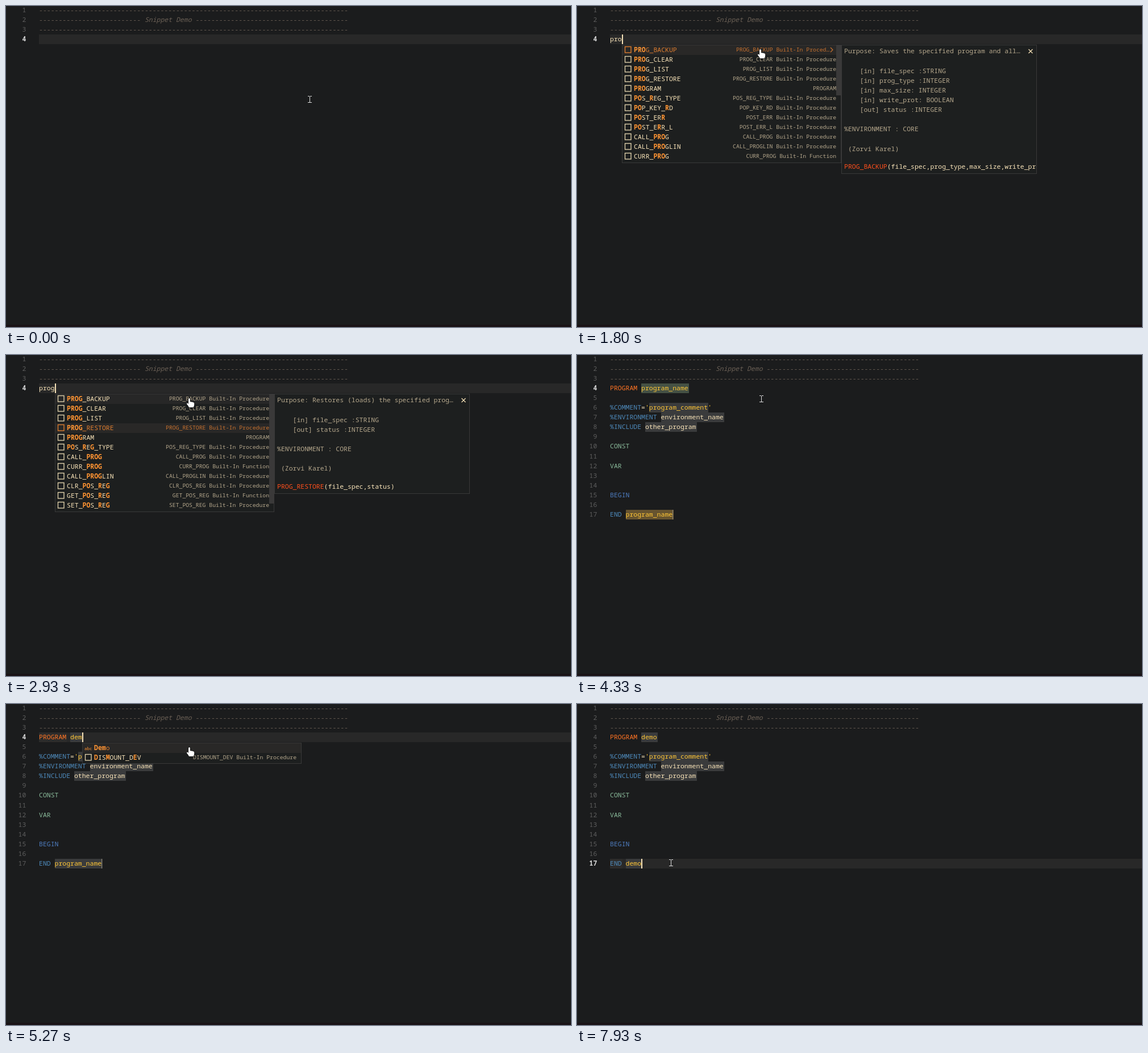
Write an HTML page with a canvas that moves like this. It is 994 by 564 pixels and loops after 8 s.

```html
<!DOCTYPE html>
<html lang="en">
<head>
<meta charset="utf-8">
<title>Snippet Demo</title>
<style>
html, body { margin: 0; width: 100%; height: 100%; overflow: hidden; background: #1b1c1d; }
canvas { display: block; }
</style>
</head>
<body>
<canvas id="stage" width="994" height="564"></canvas>
<script>
const ctx = document.getElementById('stage').getContext('2d');
const LOOP = 8000, TICK = 1000 / 15;
const LEFT = 58, CHAR = 6.885, ROW = 17.08, SMALL = 5.87;
const POP_TOP = 68, POP_W = 386, DOC_W = 344;

const C = {
  bg: '#1b1c1d', line: '#282828', fg: '#f8e3b8', dim: '#b5a78c', comment: '#6b6056',
  number: '#5e5e5e', activeNumber: '#d8d8d8', orange: '#ff7424', match: '#ff9433',
  picked: '#dc7c2f', yellow: '#ffc636', blue: '#4e8abb', begin: '#4e7dc0', green: '#8abb9b',
  call: '#ff4f1c', slot: '#3a3b3c', selected: '#455144', same: '#67542f', word: '#2d2c2b',
  border: '#393939', pop: '#1d1f1f', row: '#292827', scroll: '#3a3939'
};

const rect = (x, y, w, h, color) => { ctx.fillStyle = color; ctx.fillRect(x, y, w, h); };
const lineTop = n => 50 + (n - 4) * ROW;
const colX = col => LEFT + col * CHAR;

// Monospace text on a fixed character grid.
function text(str, x, baseline, color, { style = '500', step = CHAR } = {}) {
  ctx.font = `${style} ${step / 0.6}px "Noto Sans Mono", "DejaVu Sans Mono", monospace`;
  ctx.fillStyle = color;
  [...str].forEach((ch, i) => { if (ch !== ' ') ctx.fillText(ch, x + i * step, baseline); });
}

function stroke(color, width, ...lines) {
  ctx.strokeStyle = color;
  ctx.lineWidth = width;
  ctx.beginPath();
  for (const points of lines) points.forEach(([x, y], i) => i ? ctx.lineTo(x, y) : ctx.moveTo(x, y));
  ctx.stroke();
}

// Segments are [text, color, background].
function segments(list, x, top) {
  for (const [str, color, back] of list) {
    const w = str.length * CHAR;
    if (back) rect(Math.round(x), Math.round(top), Math.round(w + 1), 17, back);
    text(str, x, Math.round(top + 12), color);
    x += w;
  }
}

function programLines(name, endName, nameBack, endBack, slot, keyBack, endKeyBack) {
  return [
    [['PROGRAM', C.orange, keyBack], [' '], [name, C.yellow, nameBack]],
    [],
    [['%COMMENT', C.blue], ['=', C.fg], ["'", C.yellow], ['program_comment', C.yellow, slot], ["'", C.yellow]],
    [['%ENVIRONMENT', C.blue], [' '], ['environment_name', C.fg, slot]],
    [['%INCLUDE', C.blue], [' '], ['other_program', C.fg, slot]],
    [],
    [['CONST', C.green]],
    [],
    [['VAR', C.green]],
    [], [],
    [['BEGIN', C.begin]],
    [],
    [['END', C.blue, endKeyBack], [' '], [endName, C.yellow, endBack]]
  ];
}

// Asterisks toggle matched letters; suffix: F function, K keyword, W plain word.
const LISTS = {
  pro: ['*PRO*G_BACKUP', '*PRO*G_CLEAR', '*PRO*G_LIST', '*PRO*G_RESTORE', '*PRO*GRAM:K',
    '*PO*S_*R*EG_TYPE', '*PO*P_KEY_*R*D', '*PO*ST_ER*R*', '*PO*ST_E*R*R_L', 'CALL_*PRO*G',
    'CALL_*PRO*GLIN', 'CURR_*PRO*G:F'],
  prog: ['*PROG*_BACKUP', '*PROG*_CLEAR', '*PROG*_LIST', '*PROG*_RESTORE', '*PROG*RAM:K',
    '*PO*S_*R*E*G*_TYPE', 'CALL_*PROG*', 'CURR_*PROG*:F', 'CALL_*PROG*LIN', 'CLR_*PO*S_*R*E*G*',
    'GET_*PO*S_*R*E*G*:F', 'SET_*PO*S_*R*E*G*'],
  d: ['*D*ELETE_FILE', '*D*ELETE_NODE', '*D*ELETE_QUEUE', '*D*EL_INST_TPE', '*D*EF_SCREEN',
    '*D*EF_WINDOW', '*D*ELAY:K', '*D*ISABLE:K', '*D*ISMOUNT_DEV', '*D*ISCONNECT:K', '*D*O:K', '*D*OWNTO:K'],
  de: ['*De*mo:W', '*DE*LAY:K', '*DE*LETE_FILE', '*DE*LETE_NODE', '*DE*LETE_QUEUE', '*DE*L_INST_TPE',
    '*DE*F_SCREEN', '*DE*F_WINDOW', 'IN*DE*X:K', 'MO*DE*L:K', 'NO*DE*DATA:K', '*D*ISMOUNT_D*E*V'],
  dem: ['*Dem*o:W', '*D*IS*M*OUNT_D*E*V'],
  demo: ['*Demo*:W']
};

const DOCS = {
  backup: ['Saves the specified program and all…',
    ['[in] file_spec :STRING', '[in] prog_type :INTEGER', '[in] max_size: INTEGER',
      '[in] write_prot: BOOLEAN', '[out] status :INTEGER'],
    'PROG_BACKUP', '(file_spec,prog_type,max_size,write_prot,status)'],
  clear: ['Clears the specified program from m…',
    ['[in] prog_name :STRING', '[out] status :INTEGER'], 'PROG_CLEAR', '(prog_name,status)'],
  list: ['Returns a list of program names.',
    ['[in] prog_name :STRING', '[in] prog_type :INTEGER', '[in,out] n_skip :INTEGER', '[in] format :INTEGER',
      '[out] ary_nam :ARRAY of STRING', '[out] n_progs :INTEGER', '[out] status :INTEGER', '[in,out] f_index :INTEGER'],
    'PROG_LIST', '(prog_name,prog_type,n_skip,format,ary_nam,n_progs)'],
  restore: ['Restores (loads) the specified prog…',
    ['[in] file_spec :STRING', '[out] status :INTEGER'], 'PROG_RESTORE', '(file_spec,status)'],
  remove: ['Deletes the specified file.',
    ['[in] file_spec :STRING', '[in] nowait_sw :BOOLEAN', '[out] status :INTEGER'],
    'DELETE_FILE', '(file_spec,nowait_sw,status)']
};

// Latest entry whose start time has passed: [start, ...values].
const at = (track, t) => track.findLast(entry => t >= entry[0]).slice(1);

const TYPED = [[0, ''], [1530, 'p'], [1600, 'pr'], [1670, 'pro'], [1870, 'prog']];
const NAME = [[0, 'program_name'], [4870, 'd'], [5070, 'de'], [5200, 'dem'], [5330, 'demo']];
// [start, list, caret column, selected row, docs, scrollbar height]
const POPUPS = [
  [0], [1730, 'pro', 3, 0, null, 88], [1800, 'pro', 3, 0, 'backup', 88],
  [1930, 'prog', 4, 0, 'backup', 192], [2670, 'prog', 4, 1, 'clear', 192],
  [2800, 'prog', 4, 2, 'list', 192], [2930, 'prog', 4, 3, 'restore', 192],
  [3200, 'prog', 4, 4, 'program', 192], [3800],
  [4930, 'd', 9, 0, null, 60], [5000, 'd', 9, 0, 'remove', 60], [5130, 'de', 10, 0, null, 150],
  [5270, 'dem', 11, 0, null, 0], [5330, 'demo', 12, 0, null, 0], [6470]
];
const CARET = [[0, false], [540, true], [1070, false], [1530, true], [2400, false], [2930, true],
  [3400, false], [3800, true], [4330, false], [4870, true], [5870, false], [6330, true],
  [7200, false], [7600, true]];
// [start, end, from, bend, to]
const MOVES = [
  [0, 800, [534, 164], [365, -58], [324, 77]],
  [5740, 6330, [324, 77], [235, 118], [127, 61]],
  [6610, 7470, [127, 61], [195, 420], [165, 279]]
];

function pointer(t) {
  const now = Math.floor((t + 4) / TICK) * TICK;
  const [start, end, a, b, c] = MOVES.findLast(m => now >= m[0]);
  const p = Math.min(1, (now - start) / (end - start));
  const u = p * p * (3 - 2 * p);
  return a.map((v, i) => Math.round(v * (1 - u) ** 2 + 2 * b[i] * u * (1 - u) + c[i] * u * u));
}

function drawHeader(marked) {
  const base = n => Math.round(lineTop(n) + 12);
  const dashes = (n, col, count) => text('-'.repeat(count), colX(col), base(n), C.comment, { style: '400' });
  if (marked) rect(colX(35), 16, 4 * CHAR, 17, C.same);
  dashes(1, 0, 79);
  dashes(2, 0, 26);
  text('Snippet Demo', colX(27), base(2), C.comment, { style: 'italic' });
  dashes(2, 40, 39);
  dashes(3, 0, 79);
}

function drawEditor(t) {
  const inserted = t >= 3800;
  const atEnd = t >= 7600;
  const nameSelected = inserted && t < 4870;
  const demoSelected = t >= 6670 && t < 7600;
  const endSelected = t >= 7670 && t < 7870;
  const active = atEnd ? 17 : 4;
  const [typed] = at(TYPED, t), [name] = at(NAME, t);
  const endName = t >= 7870 ? 'demo' : 'program_name';
  const plain = !nameSelected && !demoSelected && !endSelected;

  if (plain) rect(LEFT, Math.round(lineTop(active)), 994 - LEFT, 17, C.line);
  drawHeader(demoSelected);
  for (let n = 1; n <= (inserted ? 17 : 4); n++) {
    const label = String(n), on = n === active;
    text(label, 35.3 - label.length * CHAR, Math.round(lineTop(n) + 12),
      on ? C.activeNumber : C.number, { style: on ? 'bold' : '400' });
  }

  let col = typed.length;
  if (!inserted) text(typed, LEFT, 62, C.fg);
  else {
    const nameBack = nameSelected || demoSelected ? C.selected : C.slot;
    const endBack = nameSelected ? C.same : endSelected ? C.selected : C.slot;
    programLines(name, endName, nameBack, endBack, C.slot,
      plain && !atEnd ? C.word : null, plain && atEnd ? C.word : null)
      .forEach((list, i) => segments(list, LEFT, lineTop(4 + i)));
    if (!atEnd) rect(168, 272, 1, 17, '#8c8778');
    col = atEnd ? 4 + endName.length : 8 + name.length;
  }
  if (at(CARET, t)[0]) rect(Math.round(colX(col)), Math.round(lineTop(active)), 2, 17, C.fg);
}

function panel(x, w, bottom) {
  rect(x, POP_TOP, w, bottom - POP_TOP, C.border);
  rect(x + 1, POP_TOP + 1, w - 2, bottom - POP_TOP - 2, C.pop);
}

function drawItem(item, x, top, picked, hovered, cutDetail) {
  const [marked, kind] = item.split(':');
  const label = marked.replaceAll('*', '');
  const base = Math.round(top + 12);
  if (picked || hovered) rect(x + 1, Math.round(top), POP_W - 2, 17, picked ? C.row : '#272727');
  if (kind === 'W') text('abc', x + 4, base, C.match, { step: 4.5 });
  else {
    ctx.strokeStyle = picked ? C.picked : '#dccda8';
    ctx.lineWidth = 1.4;
    ctx.strokeRect(x + 5.5, base - 9.5, 10.5, 10.5);
  }
  let cx = x + 21;
  marked.split('*').forEach((part, i) => {
    const hit = i % 2 === 1;
    text(part, cx, base, hit ? C.match : picked ? C.picked : C.fg, { style: hit ? 'bold' : '500' });
    cx += part.length * CHAR;
  });
  if (kind === 'W') return;
  const color = picked ? '#c8722f' : C.dim;
  const detail = kind === 'K' ? label : `${label} Built-In ${kind === 'F' ? 'Function' : 'Procedure'}`;
  const end = x + POP_W - 9;
  if (cutDetail) {
    text(detail.slice(0, -3) + '…', end - 176, base - 1, color, { step: SMALL });
    stroke(color, 1.2, [[end - 10, base - 8], [end - 6, base - 4], [end - 10, base]]);
  } else text(detail, end - detail.length * SMALL, base - 1, color, { step: SMALL });
}

function drawDocs(key, x) {
  const tx = x + 5;
  const doc = DOCS[key];
  const bottom = doc ? Math.round(295 + (doc[1].length - 5) * ROW) : 346;
  panel(x, DOC_W, bottom);
  ctx.save();
  ctx.beginPath();
  ctx.rect(x, POP_TOP, DOC_W - 1, bottom - POP_TOP);
  ctx.clip();
  if (doc) {
    const [purpose, params, call, args] = doc;
    text('Purpose: ' + purpose, tx, 83, C.dim);
    const lines = [...params.map(p => '    ' + p), '', '%ENVIRONMENT : CORE', '', ' (Zorvi Karel)'];
    lines.forEach((line, i) => text(line, tx, Math.round(118 + i * ROW), C.dim));
    segments([[call, C.call], [args, C.fg]], tx, bottom - 21.5);
  } else {
    text('PROGRAM', tx, 83, C.dim);
    programLines('program_name', 'program_name').forEach((list, i) => segments(list, tx, 102 + i * ROW));
  }
  ctx.restore();
  const cx = x + DOC_W - 11, r = 3.5;
  stroke(C.fg, 1.2, [[cx - r, 79.5 - r], [cx + r, 79.5 + r]], [[cx + r, 79.5 - r], [cx - r, 79.5 + r]]);
}

// Returns whether the pointer is over the list.
function drawPopup(t, [mx, my]) {
  const [key, col, picked, docs, scroll] = at(POPUPS, t);
  if (!key) return false;
  const items = LISTS[key], x = Math.round(colX(col));
  const bottom = Math.round(POP_TOP + 3 + items.length * ROW);
  const over = mx > x && mx < x + POP_W && my > POP_TOP && my < bottom;
  const hovered = over ? Math.floor((my - POP_TOP - 1) / ROW) : -1;
  panel(x, POP_W, bottom);
  items.forEach((item, i) =>
    drawItem(item, x, POP_TOP + 0.6 + i * ROW, i === picked, i === hovered, key === 'pro' && i === 0));
  if (scroll) rect(x + POP_W - 9, POP_TOP + 1, 9, scroll, C.scroll);
  if (docs) drawDocs(docs, x + POP_W);
  return over;
}

const HAND = new Path2D('M-3 0.5Q-3-1.5-1.5-1.5T0 .5V5Q2 3.8 2.8 5.4Q4.6 4.4 5.2 6Q7 5.4 7.2 7.5V10Q7 12.5 5.5 14.5H-2Q-3.5 11.5-6 8.8Q-6.5 6.6-4.5 7L-3 8.4Z');

function drawPointer([x, y], hand) {
  if (hand) {
    ctx.save();
    ctx.translate(x, y + 0.5);
    ctx.lineWidth = 1.5;
    ctx.strokeStyle = '#111';
    ctx.stroke(HAND);
    ctx.fillStyle = '#fff';
    ctx.fill(HAND);
    ctx.restore();
    return;
  }
  rect(x, y - 5, 1, 11, '#dedede');
  for (const dy of [-6, 5]) {
    rect(x - 3, y + dy, 3, 1, '#dedede');
    rect(x + 1, y + dy, 3, 1, '#dedede');
  }
}

function frame(now) {
  const t = now % LOOP;
  const mouse = pointer(t);
  rect(0, 0, 994, 564, C.bg);
  rect(0, 560, 994, 4, '#1a1316');
  drawEditor(t);
  drawPointer(mouse, drawPopup(t, mouse));
  requestAnimationFrame(frame);
}
requestAnimationFrame(frame);
</script>
</body>
</html>
```
